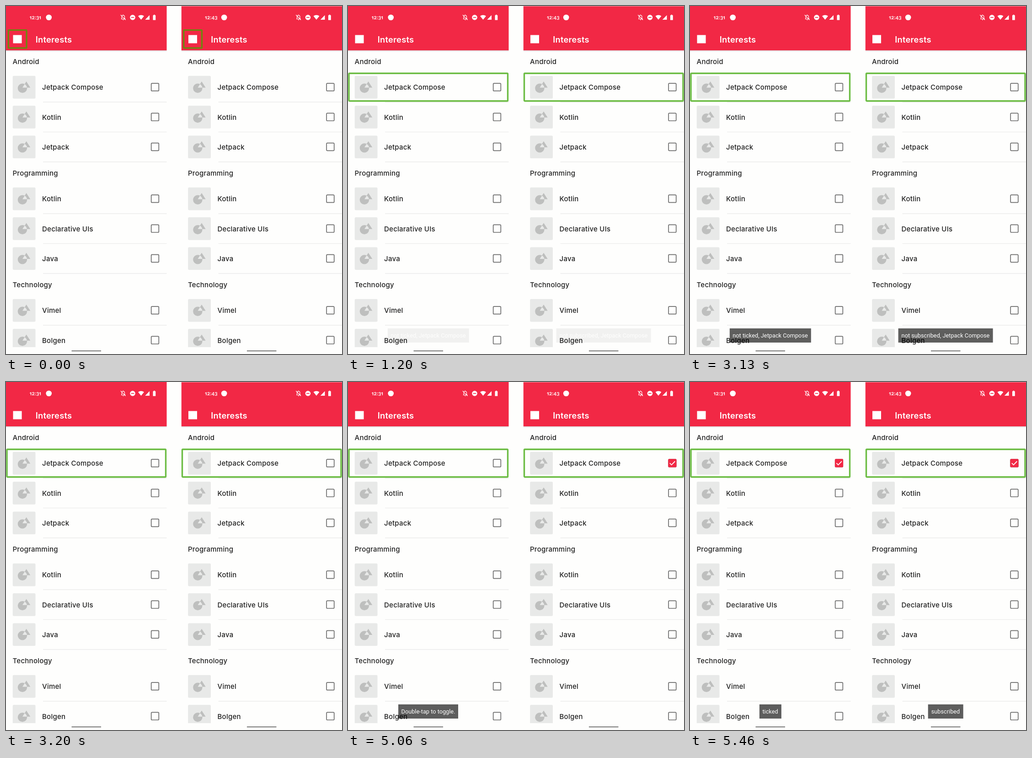
Animation of 735 by 761 pixels, one loop 6.93 s. Source, as an HTML page:

```html
<!DOCTYPE html>
<html lang="en">
<head>
<meta charset="utf-8">
<title>Interests</title>
<style>
  html, body { margin: 0; width: 100%; height: 100%; overflow: hidden; background: #fefefd; }
  svg { position: absolute; left: 0; top: 0; }
  text { font: 500 15px Inter, sans-serif; letter-spacing: .25px; fill: #202020; }
  .title { font-size: 18.3px; font-weight: 600; fill: #fff; }
  .clock { font: 700 12px Lato, sans-serif; font-variant-numeric: oldstyle-nums proportional-nums; letter-spacing: 0; fill: #fff; }
  .toast {
    position: absolute; top: 705px; height: 31px; padding: 0 7px; transform: translateX(-50%);
    font: 12.75px/32px Roboto, sans-serif; white-space: nowrap; color: #fff; background: rgba(0, 0, 0, .63);
  }
</style>
</head>
<body>
<svg id="stage" width="735" height="761" viewBox="0 0 735 761">
  <defs>
    <clipPath id="screen"><rect width="351.5" height="746"/></clipPath>
    <linearGradient id="shade" x2="0" y2="1">
      <stop stop-color="#000" stop-opacity=".15"/><stop offset="1" stop-color="#000" stop-opacity="0"/>
    </linearGradient>
    <g id="status" fill="#fff">
      <circle cx="93.7" cy="25" r="6.3"/>
      <path d="M252.5 28.5h8l-1-1.8v-3.200a3.200 3.200 0 0 0-6.400 0v3.200zM255.5 30.300h2M256.300 20v-1.300M250.800 19.500l10.700 11"
            fill="none" stroke="#fff" stroke-width="1.2"/>
      <circle cx="277" cy="25" r="5.800"/>
      <path d="M273.700 25h6.600" stroke="#f22845" stroke-width="1.600"/>
      <path d="M289 22q6.500-4.500 13 0L295.500 30zM304.300 30h9.700V20z"/>
      <path d="M321.500 20.300h1.600v-1.300h2.600v1.300h1.600v10.500h-5.800z"/>
    </g>
    <g id="row">
      <rect x="14.700" y="-24.800" width="49.800" height="49.600" rx="2.500" fill="#e8e9e8"/>
      <path d="M25.700 2.200a10.200 10.200 0 1 0 20.400 0a10.200 10.200 0 1 0-20.400 0zM44.500-12.500L36 .8H53.200z"
            fill="#bebfbe" fill-rule="evenodd"/>
      <rect x="317.700" y="-8.500" width="16.600" height="16.600" rx="1.800" fill="none" stroke="#6b6b6b" stroke-width="1.700"/>
    </g>
    <g id="tick">
      <rect x="316.900" y="-9.300" width="18.200" height="18.200" rx="2.200" fill="#f22845"/>
      <path d="M320.400-.2l3.800 3.900l7.600-7.800" fill="none" stroke="#fff" stroke-width="1.800"/>
    </g>
  </defs>
</svg>
<script>
const LOOP = 6930;
const PHONE_OFFSET = 383.5;
const FOCUS_MOVES = 1130;
const SECTIONS = [
  ["Android", "Jetpack Compose", "Kotlin", "Jetpack"],
  ["Programming", "Kotlin", "Declarative UIs", "Java"],
  ["Technology", "Vimel", "Bolgen"]
];
const rowY = (section, row) => 177.6 + 244 * section + 65.3 * row;

// Each toast: start, end, text, fade-in duration
const phones = [
  {
    clock: "12:31", tickAt: 5330,
    toasts: [[1190, 3200, "not ticked, Jetpack Compose", 140], [3430, 5330, "Double-tap to toggle.", 100],
             [5459, LOOP, "ticked", 1]]
  },
  {
    clock: "12:43", tickAt: 5060,
    toasts: [[1190, 3200, "not subscribed, Jetpack Compose", 140], [3430, 5060, "Double-tap to toggle.", 100],
             [5129, LOOP, "subscribed", 1]]
  }
];

function sectionMarkup([heading, ...topics], s) {
  const rows = topics.map((topic, r) => {
    const y = rowY(s, r);
    return `<use href="#row" y="${y}"/><text x="79" y="${y + 5.6}">${topic}</text>
      <path d="M81 ${y + 32.6}h271" stroke="#e8e8e8" stroke-width="1.2"/>`;
  });
  return `<text x="14.5" y="${127.3 + 244 * s}">${heading}</text>${rows.join("")}`;
}

function phoneMarkup(phone, i) {
  return `<g transform="translate(${i * PHONE_OFFSET})">
    <g clip-path="url(#screen)">
      ${SECTIONS.map(sectionMarkup).join("")}
      <rect y="97" width="352" height="3" fill="url(#shade)"/>
      <rect y="${i * 0.5}" width="352" height="${97 - i * 0.5}" fill="#f22845"/>
    </g>
    <text class="clock" x="51.5" y="29">${phone.clock}</text>
    <use href="#status"/>
    <rect x="15.5" y="63.5" width="19" height="18" fill="#fff"/>
    <text class="title" x="64.7" y="79.6">Interests</text>
    <path d="M143.5 754.3h64.5" stroke="#757575" stroke-width="2"/>
    <use class="tick" href="#tick" y="${rowY(0, 0)}"/>
    <rect class="iconFocus" x="5.3" y="52.6" width="39.7" height="39.3" rx="1" fill="none" stroke="#708510" stroke-width="3.4"/>
    <rect class="rowFocus" x="2" y="147.2" width="347.5" height="60.5" rx="1.5" fill="none" stroke="#6dbd45" stroke-width="3.4"/>
  </g>`;
}

const stage = document.getElementById("stage");
stage.insertAdjacentHTML("beforeend", phones.map(phoneMarkup).join(""));
const parts = name => [...stage.querySelectorAll("." + name)];
const ticks = parts("tick"), iconFocus = parts("iconFocus"), rowFocus = parts("rowFocus");
const toasts = phones.map((_, i) => {
  const toast = document.createElement("div");
  toast.className = "toast";
  toast.style.left = 175.5 + i * PHONE_OFFSET + "px";
  document.body.append(toast);
  return toast;
});

const show = (element, visible) => { element.style.opacity = Number(visible); };

function draw(t) {
  phones.forEach((phone, i) => {
    show(iconFocus[i], t < FOCUS_MOVES);
    show(rowFocus[i], t >= FOCUS_MOVES);
    show(ticks[i], t >= phone.tickAt);
    const active = phone.toasts.find(([start, end]) => t >= start && t < end);
    if (!active) return show(toasts[i], false);
    const [start, , message, fade] = active;
    toasts[i].textContent = message;
    show(toasts[i], Math.min(1, (t - start) / fade));
  });
}

const begin = performance.now();
function animate() {
  draw((performance.now() - begin) % LOOP);
  requestAnimationFrame(animate);
}
animate();
</script>
</body>
</html>
```
